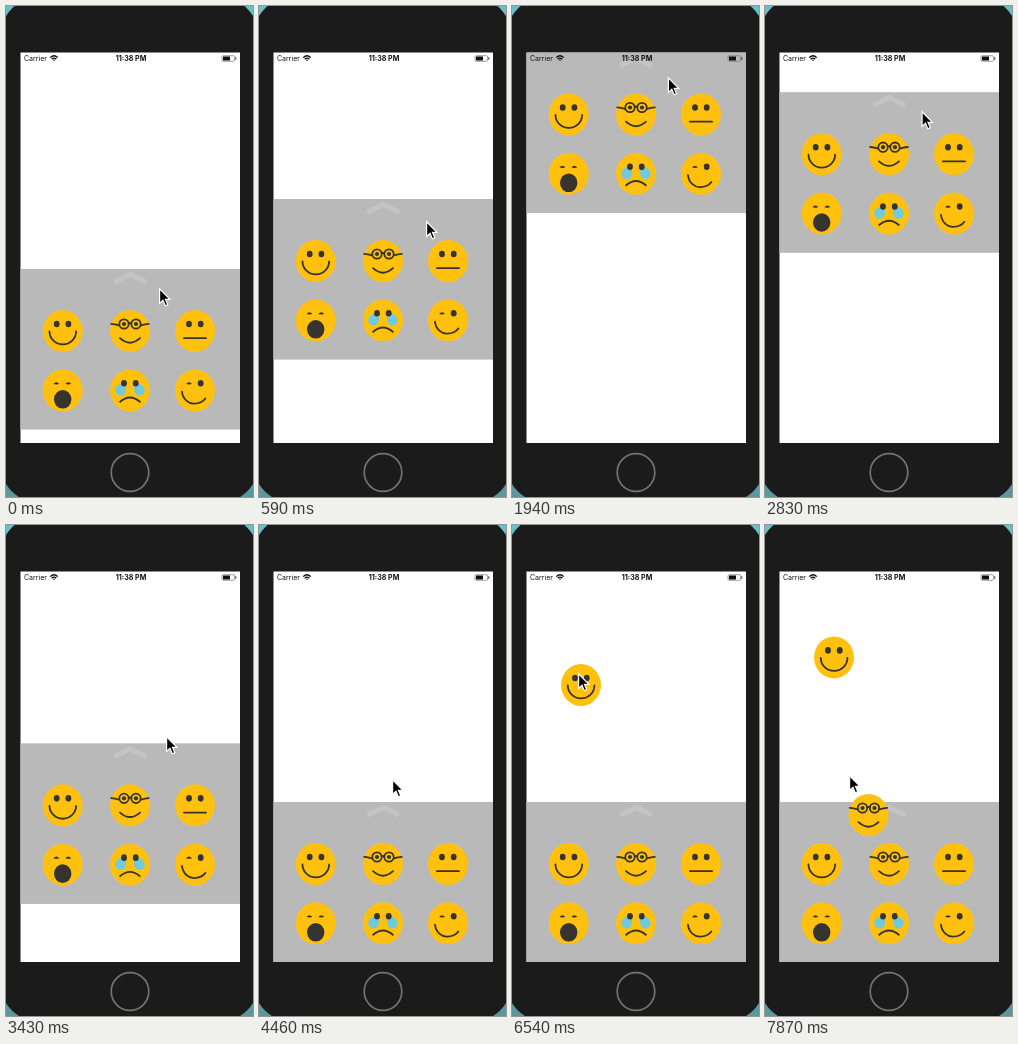
Animation of 247 by 491 pixels, one loop 8000 ms. Source, as an HTML page:

```html
<!DOCTYPE html>
<html lang="en">
<head>
<meta charset="utf-8">
<title>Emoji tray</title>
<style>
  html, body { margin: 0; width: 100%; height: 100%; overflow: hidden; }
  body { background: linear-gradient(#68c0cb, #5b979d); }
  svg { display: block; }
  text { font: 7px Inter, "Liberation Sans", sans-serif; fill: #111; }
  .skin { fill: #ffc10e; }
  .dark { fill: #37332f; }
  .line { fill: none; stroke: #37332f; stroke-width: 1.8; stroke-linecap: round; }
  .tear { fill: #6fcbdc; }
</style>
</head>
<body>
<svg width="247" height="491" viewBox="0 0 247 491">
  <defs>
    <clipPath id="screen"><rect x="14.5" y="46.5" width="219.5" height="390.5"/></clipPath>
    <ellipse id="head" class="skin" rx="20" ry="21"/>
    <ellipse id="eye" class="dark" rx="2.9" ry="3.3"/>
    <g id="eyes"><use href="#eye" x="-6" y="-7"/><use href="#eye" x="5.7" y="-7"/></g>
    <path id="lid" class="dark" d="M-3 .8Q0 -3 3 .8Q0 1.6 -3 .8Z"/>
    <path id="tear" class="tear" d="M-5 -10C-4 -6 -4 -4 -4.2 0A5.3 5.3 0 0 1 -14.8 0C-14.8 -6 -8 -6 -5 -10Z"/>
    <g id="lens"><circle class="line" r="4.7"/><circle class="dark" r="2.1"/></g>

    <g id="smile">
      <use href="#head"/><use href="#eyes"/>
      <path class="line" d="M-13.2 0.5A13.3 12.9 0 0 0 13.4 0.5"/>
    </g>
    <g id="glasses">
      <use href="#head"/>
      <use href="#lens" x="-6" y="-7"/><use href="#lens" x="6" y="-7"/>
      <g class="line">
        <path d="M-18.8 -7.2Q-15 -7 -11 -5.6M18.8 -7.2Q15 -7 11 -5.6M-1.2 -7.6Q0 -8.4 1.2 -7.6"/>
        <path d="M-10 7.2Q0 16.2 10 7.2"/>
      </g>
    </g>
    <g id="flat">
      <use href="#head"/><use href="#eyes"/>
      <path class="line" d="M-11 7.2H11"/>
    </g>
    <g id="yawn">
      <use href="#head"/>
      <use href="#lid" x="-6.3" y="-7"/><use href="#lid" x="5.6" y="-7"/>
      <ellipse class="dark" cy="9" rx="8.7" ry="9.3"/>
    </g>
    <g id="cry">
      <use href="#head"/>
      <use href="#tear"/><use href="#tear" transform="scale(-1 1)"/>
      <use href="#eyes"/>
      <path class="line" d="M-9.8 11.5Q0 3 9.8 11.5"/>
    </g>
    <g id="wink">
      <use href="#head"/>
      <use href="#lid" x="-6" y="-7"/><use href="#eye" x="5.7" y="-7"/>
      <path class="line" d="M-13 1.3C-12.3 9 -6 13.6 -1 13.4C4 13.2 8 11.5 10.4 8.2"/>
    </g>
  </defs>

  <rect x="-6" y="-9" width="259" height="506" rx="40" fill="#1b1b1b"/>
  <circle cx="124" cy="466.5" r="18.8" fill="none" stroke="#737373" stroke-width="1.7"/>

  <g clip-path="url(#screen)">
    <rect x="14" y="46" width="220" height="392" fill="#fff"/>
    <g id="tray">
      <rect x="14" width="220" height="160.6" fill="#b9b9b9"/>
      <path d="M108.5 13.3L124.3 5.2L140.2 13.3" fill="none" stroke="#c4c4c4" stroke-width="5"/>
      <use href="#smile" x="56.7" y="62"/>
      <use href="#glasses" x="124" y="62"/>
      <use href="#flat" x="189" y="62"/>
      <use href="#yawn" x="56.7" y="121.3"/>
      <use href="#cry" x="124" y="121.3"/>
      <use href="#wink" x="189" y="121.3"/>
    </g>
    <use id="smileCopy" href="#smile"/>
    <use id="glassesCopy" href="#glasses"/>

    <text x="18" y="55.2">Carrier</text>
    <text x="125" y="55.3" text-anchor="middle" style="font-size:7.1px;font-weight:700">11:38 PM</text>
    <g fill="none" stroke="#111" stroke-width="1.3">
      <path d="M44.2 51.6Q48 48 51.8 51.6M45.7 53.2Q48 51 50.3 53.2"/>
      <path d="M48 55L46.9 53.9Q48 53 49.1 53.9Z" fill="#111" stroke="none"/>
      <rect x="216" y="49.7" width="12.6" height="5.6" rx="1.3" stroke="#777" stroke-width=".7"/>
      <path d="M217 50.5H224V54.5H217ZM229.4 51.3H230.2V53.7H229.4Z" fill="#111" stroke="none"/>
    </g>
  </g>

  <g id="cursor">
    <path d="M.6 .8V15.4L4 12.3L6.3 17.8L8.8 16.7L6.5 11.4H11Z" fill="#000" stroke="#fff" stroke-width="1.2"/>
  </g>
</svg>
<script>
const LOOP = 8000, STEP = 148.5;
const linear = f => f;
const easeIn = f => 1 - Math.cos(f * Math.PI / 2);
const easeOut = f => Math.sin(f * Math.PI / 2);
const smooth = f => (1 - Math.cos(f * Math.PI)) / 2;

// A track starts at a point and makes moves: first step, last step, x, y, easing.
const tray = { start: [0, 263], moves: [
  [0, 4, 0, 193, smooth],      // drag up
  [7, 10, 0, 46.5, easeOut],   // snap to top
  [16, 22, 0, 182, easeIn],    // drag down
  [22, 26, 0, 277, easeOut]    // settle at bottom
] };
const cursor = { start: [153, 282], moves: [
  [0, 4, 167, 215, smooth],
  [11, 13.6, 155, 61, easeOut],
  [16, 22, 160, 211, easeIn],
  [29, 30, 133, 254, linear],
  [30, 33, 56, 361, easeOut],
  [33, 34, 54, 347, linear],
  [36, 43, 66, 165, smooth],   // carry the smile
  [43, 45.5, 66, 136, easeOut],
  [47, 51, 117, 340, smooth],
  [51, 53, 84, 250, linear]    // carry the glasses
] };

function at({ start, moves }, n) {
  let p = start;
  for (const [from, to, x, y, ease] of moves) {
    if (n <= from) break;
    const f = ease(Math.min(1, (n - from) / (to - from)));
    p = [p[0] + (x - p[0]) * f, p[1] + (y - p[1]) * f];
  }
  return p;
}

function place(id, p, shown = true) {
  const el = document.getElementById(id);
  el.style.display = shown ? "" : "none";
  el.setAttribute("transform", `translate(${p})`);
}

// A carried face trails the cursor by one step until it is dropped.
function carry(id, n, grab, drop) {
  const [x, y] = at(cursor, Math.min(n, drop) - 1);
  place(id, [x + 3, y - 5], n >= grab);
}

function draw(now) {
  const n = Math.floor((now % LOOP + 5) / STEP);
  place("tray", at(tray, n));
  place("cursor", at(cursor, n));
  carry("smileCopy", n, 37, 46);
  carry("glassesCopy", n, 53, 53);
}

let begin;
function tick(now) {
  begin ??= now;
  draw(now - begin);
  requestAnimationFrame(tick);
}
draw(0);
requestAnimationFrame(tick);
</script>
</body>
</html>
```
